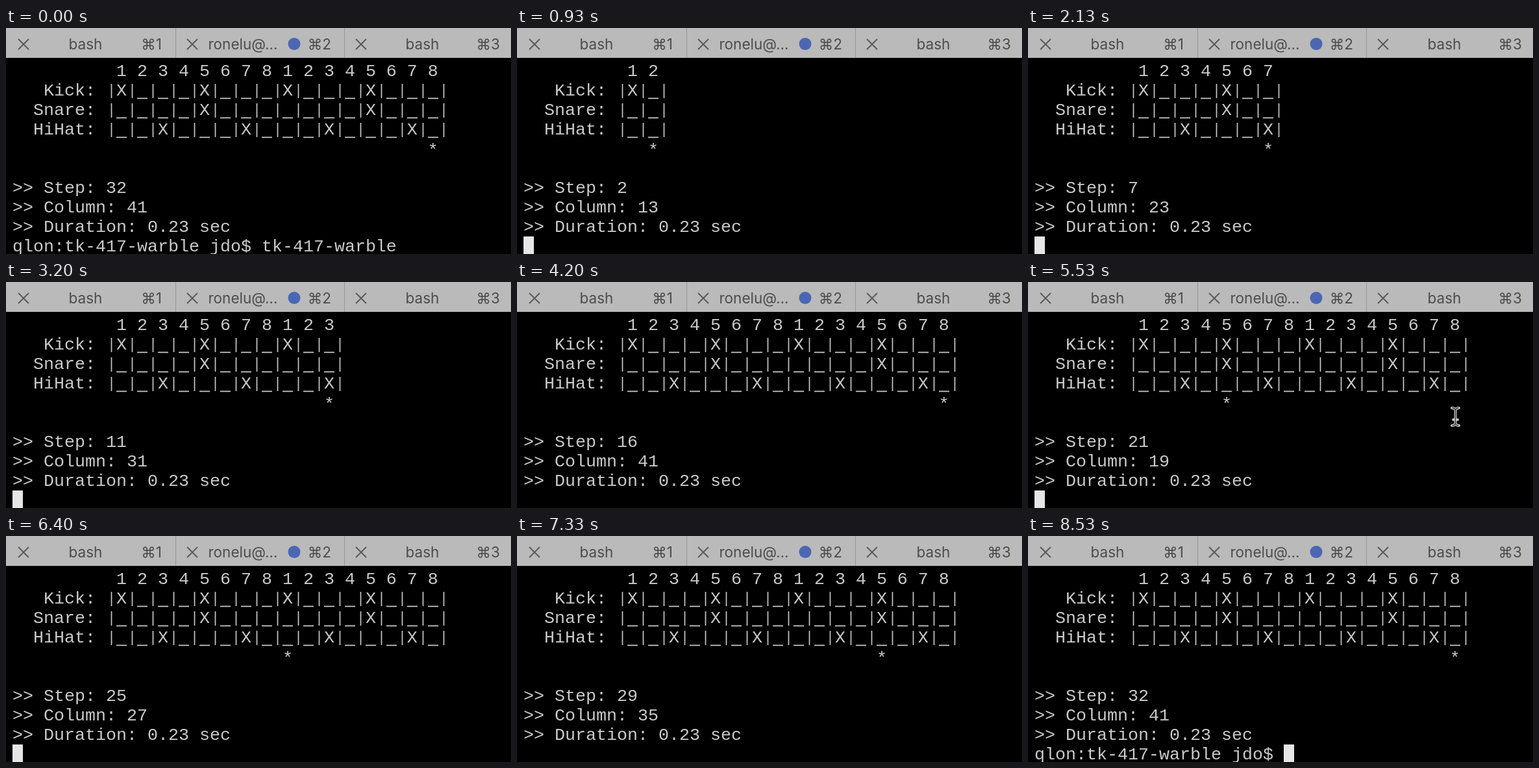
Write an HTML page that moves like this. It is 778x348 px and loops after 8600 ms.

```html
<!DOCTYPE html>
<html lang="en">
<head>
<meta charset="utf-8">
<title>Drum sequencer in a terminal</title>
<style>
  html, body { margin: 0; width: 100%; height: 100%; overflow: hidden; background: #000; }
  svg { display: block; }
  .term text { font: 26.66px "Liberation Mono", "Courier New", monospace; fill: #cacaca; white-space: pre; }
  .tabs { font: 22.5px Inter, "Open Sans", sans-serif; fill: #4c4c4c; }
  .close { stroke: #585858; stroke-width: 1.8; fill: none; }
</style>
</head>
<body>
<svg id="stage" width="778" height="348" viewBox="0 0 778 348">
  <rect width="778" height="348"/>
  <rect width="778" height="46" fill="#bababa"/>
  <path d="M261.5 0V46M521.5 0V46" stroke="#969696"/>
  <g id="tabs" class="tabs"></g>
  <g id="lines" class="term"></g>
  <path id="grid" fill="none" stroke="#c8c8c8" stroke-width="1.7"/>
  <rect id="cursor" width="16" height="28" fill="#e6e6e6"/>
  <g id="pointer" fill="none" stroke-linecap="round">
    <path d="M653 194Q658 194 658.5 198Q659 194 664 194M658.5 198V217M653 221Q658 221 658.5 217Q659 221 664 221M655 212H662" stroke="#c4c4c4" stroke-width="4"/>
    <path d="M654 194Q658 194 658.5 198Q659 194 663 194M658.5 198V217M654 221Q658 221 658.5 217Q659 221 663 221" stroke="#333" stroke-width="1.3"/>
  </g>
</svg>
<script>
const LOOP = 8600, TICKS_PER_SECOND = 15;
const CHAR = 16, LINE = 30, LEFT = 10, TOP = 50, ROWS = 10, COLUMNS = 16;
const PROMPT = "qlon:tk-417-warble jdo$ ";
const COMMAND = "tk-417-warble";
const TRACKS = [
  { label: "Kick", hits: [1, 5, 9, 13] },
  { label: "Snare", hits: [5, 13] },
  { label: "HiHat", hits: [3, 7, 11, 15] },
];
// Ticks at which each of the 32 steps begins.
const STEP_TICKS = [10, 14, 17, 20, 24, 28, 32, 35, 39, 42, 46, 50, 53, 56, 60, 63,
  67, 70, 74, 77, 81, 84, 88, 92, 96, 99, 103, 106, 110, 113, 117, 119];
const CLEAR_TICK = 6, END_TICK = 120;

const byId = id => document.getElementById(id);

function add(parent, tag, attributes, text = "") {
  const node = document.createElementNS("http://www.w3.org/2000/svg", tag);
  for (const name in attributes) node.setAttribute(name, attributes[name]);
  node.textContent = text;
  return parent.appendChild(node);
}

function addTab(x, titleX, title, keyX, key) {
  const tabs = byId("tabs");
  add(tabs, "path", { class: "close", d: `M${x + 19} 17l16 16m0 -16l-16 16` });
  add(tabs, "text", { x: titleX, y: 32.5, "text-anchor": "middle" }, title);
  add(tabs, "text", { x: keyX, y: 32.5, "text-anchor": "end" }, "⌘" + key);
}
addTab(0, 122.5, "bash", 240, 1);
addTab(260, 365, "ronelu@...", 501, 2);
addTab(520, 641.5, "bash", 761, 3);
add(byId("tabs"), "circle", { cx: 444, cy: 24.5, r: 9.5, fill: "#4b67b3" });

const lines = Array.from({ length: ROWS }, (_, row) =>
  add(byId("lines"), "text", { x: LEFT, y: TOP + 23.5 + row * LINE + (row === 4 ? 2 : 0) }));

const cellColumn = cell => 8 + 2 * cell;
const cells = (count, draw) =>
  Array.from({ length: count }, (_, i) => draw(i + 1)).join(" ");

function gridPath(width) {
  let d = "";
  TRACKS.forEach(({ hits }, track) => {
    const y = TOP + (track + 1) * LINE;
    for (let cell = 0; cell <= width; cell++) {
      const x = LEFT + cellColumn(cell) * CHAR;
      d += `M${x + 24.5} ${y + 6}v22`;
      if (cell && !hits.includes(cell)) d += `M${x} ${y + 28.3}h${CHAR}`;
    }
  });
  return d;
}

function screenText(step, tick) {
  if (!step) return [];
  const width = Math.min(step, COLUMNS);
  const column = (step - 1) % COLUMNS + 1;
  const indent = " ".repeat(cellColumn(1));
  return [
    indent + cells(width, cell => (cell - 1) % 8 + 1),
    ...TRACKS.map(({ label, hits }) =>
      (label + ":").padStart(8) + "  " + cells(width, cell => hits.includes(cell) ? "X" : " ")),
    " ".repeat(cellColumn(column)) + "*",
    "",
    ">> Step: " + step,
    ">> Column: " + (9 + 2 * column),
    ">> Duration: 0.23 sec",
    tick < CLEAR_TICK ? PROMPT + COMMAND : tick >= END_TICK ? PROMPT : "",
  ];
}

function cursorVisible(tick) {
  if (tick < CLEAR_TICK) return false;
  if (tick < 17) return tick < 15;
  return tick >= END_TICK || Math.floor(tick / 8) % 2 === 0;
}

function render(time) {
  const tick = Math.floor((time % LOOP + 5) * TICKS_PER_SECOND / 1000);
  const step = tick < CLEAR_TICK ? 32 : STEP_TICKS.filter(start => start <= tick).length;
  const text = screenText(step, tick);
  lines.forEach((line, row) => { line.textContent = text[row] || ""; });
  byId("grid").setAttribute("d", step ? gridPath(Math.min(step, COLUMNS)) : "");

  const cursor = byId("cursor");
  cursor.setAttribute("x", LEFT + (tick >= END_TICK ? PROMPT.length * CHAR : 0));
  cursor.setAttribute("y", step ? TOP + 1 + (ROWS - 1) * LINE : TOP);
  cursor.style.display = cursorVisible(tick) ? "" : "none";
  byId("pointer").style.display = tick >= 83 && tick < 90 ? "" : "none";
}

const start = performance.now();
function frame() {
  render(performance.now() - start);
  requestAnimationFrame(frame);
}
frame();
</script>
</body>
</html>
```
